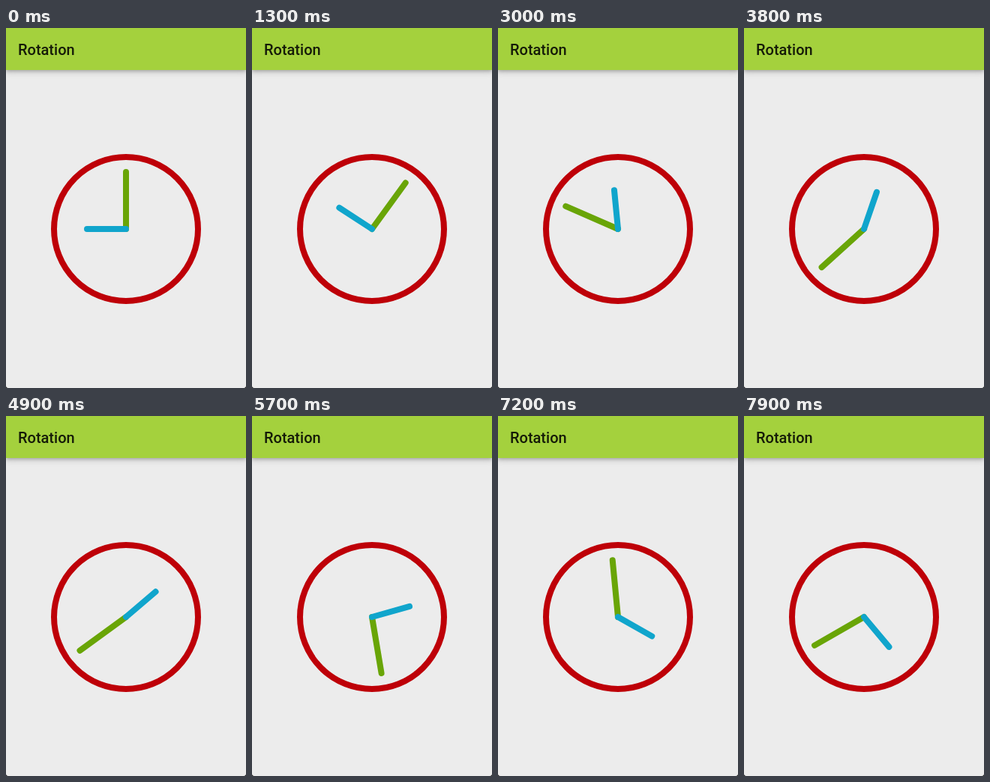
Write an HTML page that moves like this. It is 320 px wide and 480 px high and loops after 8000 ms.

```html
<!DOCTYPE html>
<html lang="en">
<head>
<meta charset="utf-8">
<title>Rotation</title>
<style>
  html, body { margin: 0; width: 100%; height: 100%; overflow: hidden; background: #000; }
  #stage { position: relative; width: 320px; height: 480px; overflow: hidden; background: #ececec; border-radius: 0 0 3px 3px; }
  header {
    position: absolute; inset: 0 0 auto; height: 56px; box-sizing: border-box; padding-left: 16px;
    background: #a4d13d; box-shadow: 0 2px 4px rgba(0, 0, 0, .2), 0 4px 8px rgba(0, 0, 0, .12);
    font: 500 20px/58px Roboto, sans-serif; color: rgba(0, 0, 0, .87);
  }
  svg { position: absolute; inset: 0; }
  svg * { fill: none; stroke-width: 8; stroke-linecap: round; }
</style>
</head>
<body>
<div id="stage">
  <header>Rotation</header>
  <svg width="320" height="480" viewBox="0 0 320 480">
    <g transform="translate(160 268)">
      <circle r="96" stroke="#be0008"/>
      <path id="minute" d="M0 0V-76" stroke="#69a507"/>
      <path id="hour" d="M0 0V-52" stroke="#10a5cc"/>
    </g>
  </svg>
</div>
<script>
  const LOOP = 8000, STEP = 100;
  // [loop time in ms, turns of the minute hand]
  const turns = [
    [0, 0], [200, 0], [1300, 1.1], [2300, 2.1], [3800, 3.633],
    [4900, 4.65], [6600, 6.4], [7900, 7.667]
  ];
  const minute = document.getElementById('minute');
  const hour = document.getElementById('hour');

  function turnsAt(t) {
    const i = Math.max(1, turns.findIndex(([time]) => time >= t));
    const [t0, a] = turns[i - 1], [t1, b] = turns[i];
    return a + (b - a) * (t - t0) / (t1 - t0);
  }

  function setAngle(hand, degrees) {
    hand.setAttribute('transform', `rotate(${degrees})`);
  }

  function draw(now) {
    const t = Math.floor((now % LOOP) / STEP) * STEP;
    const n = turnsAt(t);
    setAngle(minute, n * 360);
    setAngle(hour, 270 + n * 30);
  }

  let start;
  function tick(now) {
    start ??= now;
    draw(now - start);
    requestAnimationFrame(tick);
  }
  draw(0);
  requestAnimationFrame(tick);
</script>
</body>
</html>
```
